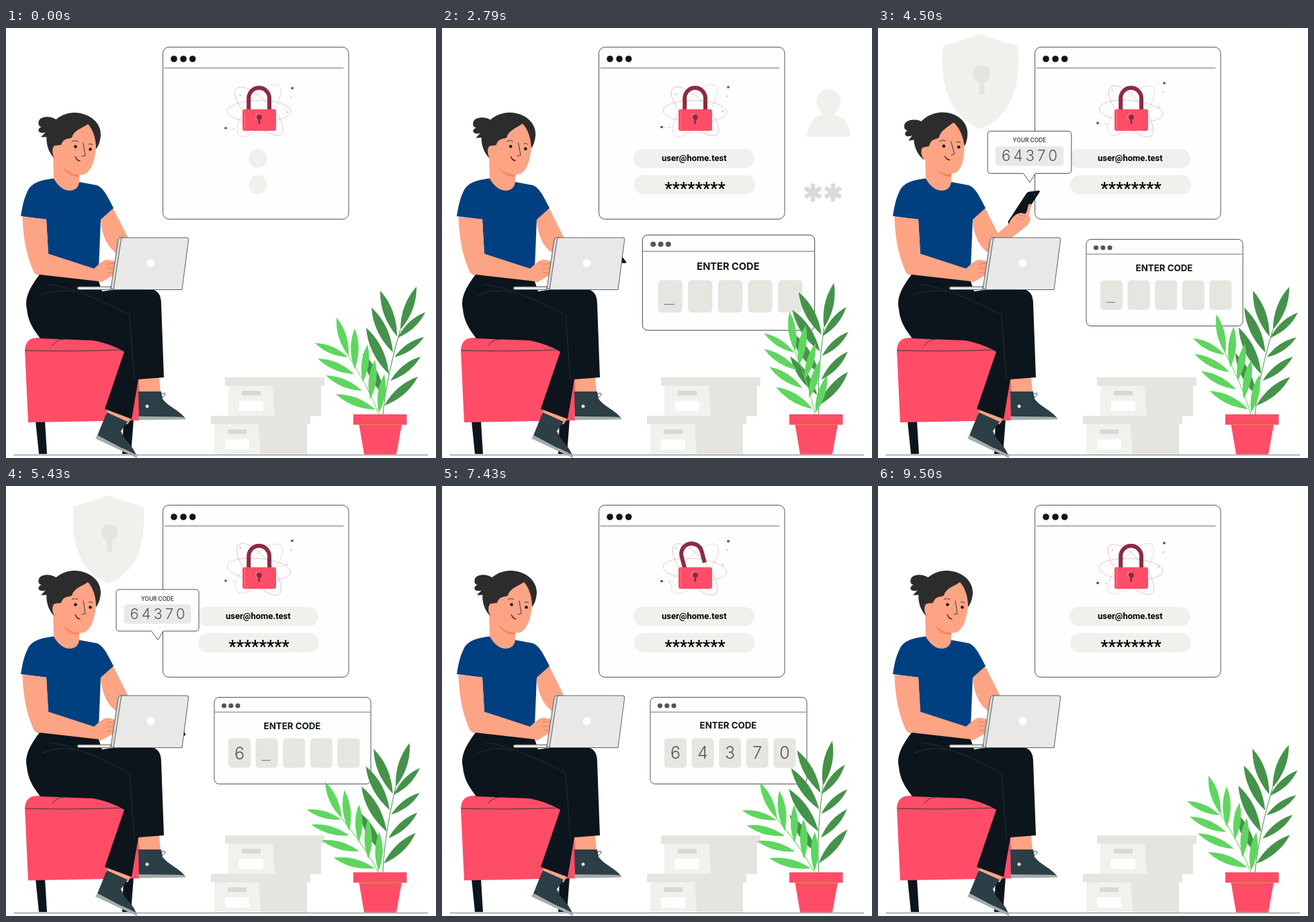
An HTML page that plays this animation: 640 px wide and 640 px high, repeating every 9570 ms.

```html
<!DOCTYPE html>
<html lang="en">
<head>
<meta charset="utf-8">
<title>Two-step sign in</title>
<style>
  html, body { margin: 0; width: 100%; height: 100%; overflow: hidden; background: #fff; }
  svg { display: block; width: 100vw; height: 100vh; }
  .ink { fill: #0c151b; }
  .red { fill: #ff4d68; }
  .skin { fill: #fda485; }
  .pale { fill: #f0f0ed; }
  .line { fill: none; stroke: #263238; stroke-width: .9; stroke-linecap: round; }
  .pane { fill: #fefefe; stroke: #3a3f42; stroke-width: .9; }
  .mail { font: 700 13px Roboto, sans-serif; }
  .pass { font: 500 25.5px Roboto, sans-serif; }
  .head { font: 700 13.3px Inter, sans-serif; text-anchor: middle; }
  .note { font: 600 8.3px Inter, sans-serif; text-anchor: middle; fill: #444; }
  .code { font: 300 22px Inter, sans-serif; letter-spacing: 4px; text-anchor: middle; fill: #555; }
  .digit { font: 300 25px Inter, sans-serif; text-anchor: middle; fill: #555; }
</style>
</head>
<body>
<svg viewBox="0 0 640 640" xmlns="http://www.w3.org/2000/svg">
  <path class="line" d="M12 635.5H628" stroke-opacity=".7"/>

  <!-- sign-in window -->
  <rect class="pane" x="233.5" y="28.5" width="276.5" height="256" rx="9"/>
  <path class="line" d="M236 59.5H502" stroke-opacity=".75"/>
  <g class="ink"><circle cx="250" cy="46" r="4.8"/><circle cx="264" cy="46" r="4.8"/><circle cx="277.7" cy="46" r="4.8"/></g>
  <g id="atom" fill="none" stroke="#cc9ba7" stroke-width=".55">
    <ellipse cx="376.5" cy="124" rx="47.5" ry="16"/>
    <ellipse cx="376.5" cy="124" rx="47.5" ry="18" transform="rotate(45 376.5 124)"/>
    <ellipse cx="376.5" cy="123" rx="47.5" ry="18" transform="rotate(-52 376.5 123)" stroke-dasharray="2 1"/>
  </g>
  <g id="motes" fill="#8e2a42">
    <circle cx="426" cy="89.5" r="1.8"/><circle cx="327" cy="149" r="1.8"/>
    <circle cx="424.5" cy="103" r=".6"/><circle cx="418" cy="125" r=".7"/>
    <circle cx="348.5" cy="100" r=".7"/><circle cx="339" cy="150" r=".6"/>
  </g>
  <path id="shackle" d="M361.2 123V104.5a15.4 15.4 0 0 1 30.8 0V122" fill="none" stroke="#8e2a42" stroke-width="6"/>
  <rect class="red" x="352" y="121" width="50" height="32" rx="3"/>
  <path d="M355.5 123V151" stroke="#f07f90" stroke-width=".8"/>
  <circle cx="375.8" cy="132.5" r="5" fill="#ff8a9b"/>
  <circle cx="376.8" cy="132.8" r="4.3" fill="#8e2a42"/>
  <path d="M376.8 134V142.5" stroke="#8e2a42" stroke-width="2.8"/>
  <rect id="pill1" class="pale" y="180" height="28.5" rx="14"/>
  <rect id="pill2" class="pale" y="219" height="28.5" rx="14"/>
  <text id="mail" class="mail" x="327" y="197.5"></text>
  <text id="pass" class="pass" x="331.5" y="247.5"></text>

  <!-- floating icons -->
  <g id="shield">
    <path class="pale" d="M152.5 14Q180 24 202 30Q205 31 205 36C207 88 196 126 152.5 145.5C109 126 98 88 100 36Q100 31 103 30Q127 23 152.5 14Z"/>
    <g fill="#e4e4e0"><circle cx="154" cy="69" r="12.3"/><rect x="150.3" y="75" width="7.7" height="23" rx="3.5"/></g>
  </g>
  <g id="user" class="pale">
    <ellipse cx="575.5" cy="109.5" rx="18" ry="18.5"/>
    <path d="M566 120H585V129C598 131 607 145 608 162H542.5C544 145 553 131 566 129Z"/>
  </g>
  <g id="stars" stroke="#dbdad3" stroke-width="6.5"></g>

  <!-- code window -->
  <g id="entry">
    <rect class="pane" x="310" y="314.5" width="233" height="129" rx="7"/>
    <path class="line" d="M311 336.5H542" stroke-opacity=".7"/>
    <g fill="#555"><circle cx="324.5" cy="327" r="3.6"/><circle cx="334.8" cy="327" r="3.6"/><circle cx="345" cy="327" r="3.6"/></g>
    <text class="head ink" x="426" y="361.5">ENTER CODE</text>
    <g id="cells"></g>
    <path id="caret" d="M339.5 408.3H353" stroke="#555" stroke-width=".8"/>
  </g>

  <!-- storage boxes -->
  <g id="box">
    <path d="M326 520H474V532.5H469V577.5H331.5V532.5H326Z" fill="#e5e5e0"/>
    <path d="M331.5 532.5H397L400 577.5H331.5Z" fill="#f1f1ee"/>
    <rect x="351" y="540" width="28" height="7" fill="#d9d9d3"/>
    <rect x="347" y="555" width="36" height="15" fill="#fff"/>
  </g>
  <use href="#box" x="-21" y="57.3"/>

  <!-- plant -->
  <g id="dark" fill="#45934a" stroke="#45934a"></g>
  <g id="light" fill="#5fd65f" stroke="#5fd65f"></g>
  <path class="red" d="M517 575H596.5V590.5H589L581 634.5H533L525.5 590.5H517Z"/>
  <path d="M525 590.5H589" stroke="#e0913a"/>

  <!-- stool -->
  <path class="ink" d="M44 585H58L61 634H49ZM175 582H190L186 634H173Z"/>
  <path class="red" d="M28 479C29 466 36 461 48 461H150L203 475L198 584L33 587Z"/>
  <path class="line" d="M29 480Q100 482 174 479" stroke="#3a1520"/>
  <path class="line" d="M69 472Q75 464 86 463" stroke="#3a1520"/>

  <!-- far arm -->
  <path class="skin" d="M140 282L159 267L182 313L166 335C151 329 142 306 141 285Z"/>
  <g id="arm">
    <path class="skin" d="M157 318L180 304L198 289L216 299L186 322L166 334Z"/>
    <path class="ink" d="M193.5 288L221 246Q223 243.5 226 243.5L239 242Q242 242 240 245L212 288Q205 297 194 291Z"/>
    <path class="skin" d="M195 291C197 284 204 277 212 275L222 277L227 283C226 294 216 300 204 303Z"/>
    <path d="M221 283L226 264M213 279L206 280M214 285L204 286" stroke="#fda485" stroke-width="4.5" stroke-linecap="round"/>
    <path d="M206 283L216 285M209 278L219 281" stroke="#d9765c" stroke-width=".8"/>
    <circle cx="233" cy="248" r="1" fill="#53616a"/>
  </g>

  <!-- torso -->
  <path d="M70 224C48 227 38 231 32 243C26 255 24 268 22 280L60 285L63 338L130 362L138 358L141 285L160 268C152 253 146 238 135 234L108 229Z" fill="#004080"/>
  <path class="skin" d="M70 185L71 224C78 236 86 242 95 242C103 242 108 237 109 229V205Z"/>
  <path d="M84 208Q96 223 109 221V213Z" fill="#ff8254"/>
  <g id="skull">
    <path d="M76 137C67 130 52 131 49 138C47 144 50 147 53 147C48 149 47 153 50 155C53 157 57 156 59 155L52 162.5L66 162Z" fill="#2c2c2c"/>
    <path class="skin" d="M70 180C75 160 95 140 122 141C133 150 135 165 134 180C132 195 129 208 120 216C112 221 98 219 88 210C80 203 77 196 73 192Z"/>
    <ellipse class="skin" cx="74" cy="183" rx="8" ry="10"/>
    <path d="M73 175C68 176 68 189 73 194C60 184 57 160 64 150C72 133 88 126 103 126C126 127 142 142 141 160C140 170 137 177 134 180C134 165 130 152 122 143C112 150 101 152 98 163C92 166 86 163 82 174Z" fill="#2c2c2c"/>
    <path d="M69 143Q65 149 65 154" stroke="#004080" fill="none"/>
    <circle cx="103.5" cy="176.5" r="2.3" class="ink"/><circle cx="125.5" cy="180.5" r="2.3" class="ink"/>
    <path class="line" d="M98 169Q103 166 107 169M123 173Q126 171 129 174M115 171L118 190L113 191"/>
    <path d="M103 191Q105 199 110.5 198Q106 197 103 191Z" fill="#8e1c2b" stroke="#5a1720" stroke-width=".8"/>
  </g>
  <path class="skin" d="M24.5 281L60 284.5L63 336L134 359L144 374L138 378L50 368Q42 367 40 360C30 335 26 315 24.5 281Z"/>

  <!-- legs -->
  <path class="skin" d="M197 520H228L230 542H198ZM152 566L187 580L181 590L148 575Z"/>
  <path class="ink" d="M50 367C36 385 27 402 31 418C33 440 44 452 51 462L130 465C155 470 170 478 176 482L147 567L187 582L197 523L235 520L231 410C231 398 226 389 214 389H164L143 392L138 377Z"/>
  <path class="line" d="M65 382C100 386 140 405 184 427L191 523M53 398Q75 387 103 393" stroke="#2c3e4a"/>
  <g fill="#2c3e46">
    <path d="M197 541L231 541L233 552C242 564 258 569 266 580L198 581Z"/>
    <path d="M150 572L181 586L171 600C174 612 189 621 194 636L135 609Z"/>
  </g>
  <path d="M197 578L240 578.5Q256 578 267 580V582.5L198 583.5ZM136 606L170 624Q185 630 195 636V640L133 611Z" fill="#a3adac"/>
  <path class="line" d="M229 547Q236 541 237 545Q235 550 229 551M170 602Q176 603 173 607M226 554L234 560"/>
  <circle cx="210" cy="563" r="2.5" fill="#dfe4e4"/>

  <!-- hand and laptop -->
  <g id="hand">
    <path class="skin" d="M131 358C140 350 145 344 153 345L166 348L164 366L158 369L141 379Z"/>
    <path d="M150 352L161 350M149 358L161 357M150 365L160 363" stroke="#e77d60" fill="none"/>
  </g>
  <g stroke="#4b4f52" stroke-width=".9">
    <path d="M156 388L167 315Q168 312 171 312H176L166 390Z" fill="#d9d9d9"/>
    <path d="M160 389.5L171.5 314Q172 312 174 312H269Q272 312 271.7 315L262 389.5Z" fill="#e8e8e8"/>
    <path d="M108 385H156V389.5H108Q104 387 108 385Z" fill="#e8e8e8"/>
  </g>
  <circle cx="215.5" cy="350" r="6" fill="#fff"/>

  <!-- message -->
  <g id="bubble">
    <path class="pane" d="M169 154H282Q287 154 287 159V211Q287 216 282 216H234L226 229L216.5 216H169Q164 216 164 211V159Q164 154 169 154Z"/>
    <text class="note" x="225.5" y="170.5">YOUR CODE</text>
    <rect x="175.5" y="176" width="100" height="29" rx="5" fill="#e9e9e9"/>
    <text class="code" x="227.5" y="198">64370</text>
  </g>
</svg>

<script>
const LOOP = 9570;
const $ = id => document.getElementById(id);
const set = (el, name, v) => el.setAttribute(name, v);
const clamp = v => Math.min(1, Math.max(0, v));
const span = (t, from, len) => clamp((t - from) / len);
const ease = p => (1 - Math.cos(Math.PI * p)) / 2;
const cubic = p => p < .5 ? 4 * p ** 3 : 1 - 4 * (1 - p) ** 3;
const backIn = p => 2.70158 * p ** 3 - 1.70158 * p * p;
const wave = (t, period) => Math.cos(2 * Math.PI * t / period);

// Build the repeated parts.
const leaf = ([x, y, u, v]) => {
  const dx = u - x, dy = v - y, k = .19;
  const mx = x + dx * .52, my = y + dy * .52;
  return `M${x} ${y}Q${mx - dy * k} ${my + dx * k} ${u} ${v}Q${mx + dy * k} ${my - dx * k} ${x} ${y}Z`;
};
const branch = (id, stem, leaves) => {
  $(id).innerHTML = `<path d="${stem}" fill="none"/><path d="${leaves.map(leaf).join('')}" stroke="none"/>`;
};
branch('dark', 'M561 576Q566 520 587 449', [
  [587, 449, 611, 385], [582, 459, 557, 391], [576, 483, 544, 416], [570, 515, 536, 446],
  [563, 547, 531, 484], [583, 461, 624, 423], [578, 490, 622, 460], [572, 525, 617, 489], [563, 562, 613, 519]]);
branch('light', 'M555 576Q540 535 509 487', [
  [510, 488, 492, 431], [509, 490, 460, 469], [518, 515, 464, 492], [530, 540, 476, 517],
  [550, 568, 491, 545], [519, 508, 519, 447], [531, 527, 538, 471], [542, 553, 549, 494], [555, 573, 563, 515]]);

const letters = (id, text) => {
  $(id).innerHTML = [...text].map(c => `<tspan>${c}</tspan>`).join('');
  return [...$(id).children];
};
const mail = letters('mail', 'user@home.test');
const pass = letters('pass', '********');

$('cells').innerHTML = [...'64370'].map((n, i) => {
  const x = 331 + i * 40.6;
  return `<rect x="${x}" y="375.5" width="33" height="44" rx="5" fill="#e6e6e1"/>` +
    `<text class="digit" x="${x + 16.5}" y="406.5">${n}</text>`;
}).join('');
const digits = [...document.querySelectorAll('.digit')];

$('stars').innerHTML = [552, 582, 612].map(x =>
  '<g>' + [0, 60, 120].map(a => `<path d="M${x} 231.5V258.5" transform="rotate(${a} ${x} 245)"/>`).join('') + '</g>').join('');
const stars = [...$('stars').children];

const scale = (el, s, x, y) =>
  set(el, 'transform', `translate(${x} ${y}) scale(${Math.max(0, s)}) translate(${-x} ${-y})`);
const turn = (id, a, x, y) => set($(id), 'transform', `rotate(${a} ${x} ${y})`);

// Pop in past full size, later shrink away.
const pops = [
  ['user', 575.5, 127, 150, 900, 4050, 420],
  ['entry', 426.5, 378.5, 2220, 980, 7430, 560],
  ['bubble', 225.5, 187, 3620, 980, 5750, 980],
  ['shield', 152.5, 79.5, 3804, 980, 5760, 980]
];
const popScale = (t, a, da, b, db) =>
  t < b ? 1 - backIn(1 - span(t, a, da)) : 1 - backIn(span(t, b, db));

// Move from 0 to 1 and back.
const hold = (t, a, da, b, db) => ease(span(t, a, da)) - ease(span(t, b, db));

const sway = t => {
  const keys = [-24.3, -14.6, -33.2, -24.3], step = LOOP / 3;
  const i = Math.min(2, Math.floor(t / step));
  return keys[i] + (keys[i + 1] - keys[i]) * cubic(t / step - i);
};

function draw(t) {
  for (const [id, x, y, ...times] of pops) scale($(id), popScale(t, ...times), x, y);

  const w = 27 + 153 * ease(span(t, 40, 520));
  ['pill1', 'pill2'].forEach((id, i) => {
    set($(id), 'x', 375 + i * (w - 27) / 153 - w / 2);
    set($(id), 'width', w);
  });
  mail.forEach((el, i) => set(el, 'fill-opacity', span(t, 530 + i * 80, 90)));
  pass.forEach((el, i) => set(el, 'fill-opacity', span(t, 1180 + i * 90, 90)));

  stars.forEach((el, i) => {
    set(el, 'opacity', span(t, 2150 + i * 330, 120));
    scale(el, 1 - span(t, 4070, 350), 552 + i * 30, 245);
  });

  digits.forEach((el, i) => set(el, 'fill-opacity', span(t, 5250 + i * 330, 90)));
  const typed = Math.max(0, Math.floor((t - 5250) / 330) + 1);
  set($('caret'), 'transform', `translate(${typed * 40.6} 0)`);
  set($('caret'), 'opacity', typed < 5 ? 1 : 0);

  const bob = wave(t, 976);
  set($('motes'), 'transform', `translate(0 ${4.2 * (bob - 1)})`);
  turn('atom', 3 * (1 - bob), 376.5, 124);
  turn('shackle', -15 * hold(t, 6950, 350, 8600, 350), 361, 122);

  turn('skull', -6.6 * hold(t, 2600, 600, 4550, 600), 95, 225);
  turn('arm', 78 - 78 * hold(t, 2600, 600, 4720, 870), 165, 325);
  const typing = (t > 500 && t < 1960) || (t > 5300 && t < 7300);
  turn('hand', typing ? 1.5 * Math.sin(t / 45) : 0, 133, 368);

  turn('dark', 5.2 * (wave(t + 280, LOOP / 2) - wave(280, LOOP / 2)), 558, 577);
  turn('light', sway(t) + 24.3, 557, 577);
}

function tick() {
  draw(performance.now() % LOOP);
  requestAnimationFrame(tick);
}
tick();
</script>
</body>
</html>
```
